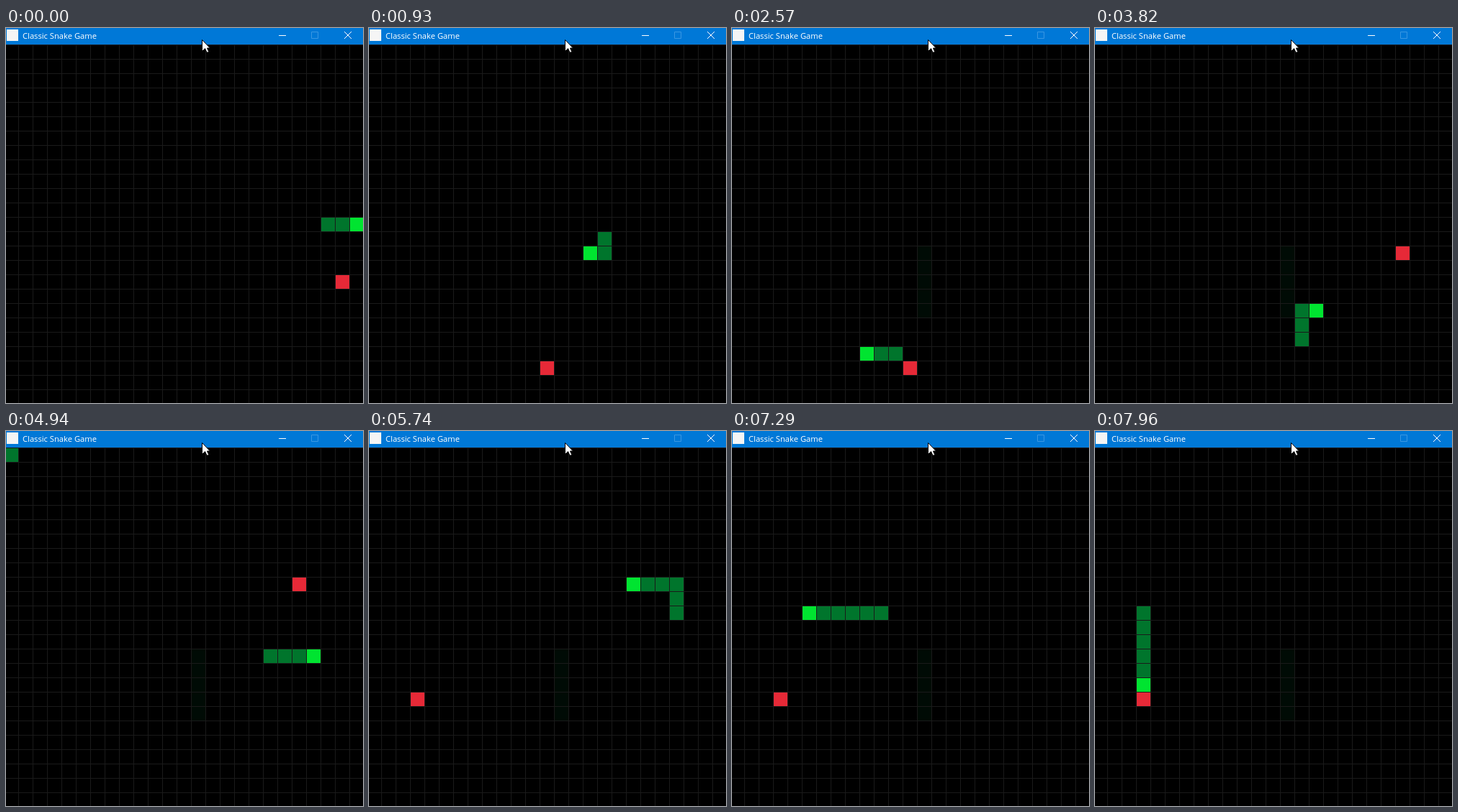
Write an HTML page with a canvas that moves like this. It is 496 px wide and 522 px high and loops after 8000 ms.

```html
<!DOCTYPE html>
<html lang="en">
<head>
<meta charset="utf-8">
<title>Classic Snake Game</title>
<style>
  html, body { margin: 0; width: 100%; height: 100%; overflow: hidden; background: #000; }
  canvas, svg { position: absolute; left: 0; top: 0; display: block; }
  text { font: 500 11.2px "Open Sans", "Noto Sans", sans-serif; fill: #fff; }
</style>
</head>
<body>
<canvas id="board" width="496" height="522"></canvas>
<svg width="496" height="522" viewBox="0 0 496 522">
  <rect width="496" height="23" fill="#0078d7"/>
  <rect x="1" y="2" width="16" height="16" fill="#f5f5f5"/>
  <text x="23" y="15">Classic Snake Game</text>
  <g fill="none" stroke="#fff">
    <path d="M379 10.5h10"/>
    <path d="M424.5 5.5h9v9h-9z" stroke="#3a97e2"/>
    <path d="M470 5l10 10M480 5l-10 10"/>
  </g>
  <path d="M272.5 16.5v16l4-4 2.5 5.5h2l.5-1.5-2-4.5h4z" fill="#fff" stroke="#000"/>
</svg>
<script>
const LOOP = 8000, CELL = 20, LEFT = -2, TOP = 24;
const HEAD = '#00e430', BODY = '#00752c', FOOD = '#e62937';
const LINE = '#1a1a1a', TRAIL = '#000b05';

const TICK = 66, LAG = 12; // the screen refreshes in ticks, in ms
const paces = [1.875, 1.675, 1.56, 1.5]; // ticks per move, faster after each meal
const foods = [[12, 22], [21, 14], [20, 9], [3, 17]];
const route = 'R4 D2 L3 D7 L4 D1 R5 U4 R3 U4 R4 U5 L10 D2 L8 D5';
const dirs = { R: [1, 0], L: [-1, 0], U: [0, -1], D: [0, 1] };

function play() {
  const states = [
    { at: 0, snake: [[24, 12], [23, 12], [22, 12]], food: [23, 16] }
  ];
  let snake = [[12, 12], [11, 12], [10, 12]], meal = 0, clock = 1.75;
  const save = () => states.push({
    at: Math.floor(clock) * TICK - LAG, snake, food: foods[meal]
  });
  save(); // restart after hitting the wall
  for (const leg of route.split(' ')) {
    const [dx, dy] = dirs[leg[0]];
    for (let n = +leg.slice(1); n > 0; n--) {
      const head = [snake[0][0] + dx, snake[0][1] + dy];
      snake = [head, ...snake.slice(0, -1)];
      clock += paces[meal];
      if (String(head) === String(foods[meal])) {
        meal++;
        snake.push([0, 0]); // a new segment waits in the corner for one move
      }
      save();
    }
  }
  return states;
}

const states = play();
const ctx = document.getElementById('board').getContext('2d');

function cell([col, row], color) {
  ctx.fillStyle = color;
  ctx.fillRect(LEFT + col * CELL, TOP + row * CELL, CELL - 1, CELL - 1);
}

function draw(step) {
  const { snake, food } = states[step];
  ctx.fillStyle = '#000';
  ctx.fillRect(0, 0, 496, 522);
  ctx.fillStyle = LINE;
  for (let i = 0; i < 25; i++) {
    ctx.fillRect(LEFT - 1 + i * CELL, TOP - 1, 1, 500);
    ctx.fillRect(0, TOP - 1 + i * CELL, 496, 1);
  }
  // faint trail left by the first long run down
  for (let row = 14; row < 19; row++) {
    if (step >= row - 4) cell([13, row], TRAIL);
  }
  cell(food, FOOD);
  snake.forEach((part, i) => cell(part, i ? BODY : HEAD));
}

const start = performance.now();
function tick() {
  const t = (performance.now() - start) % LOOP;
  draw(states.filter(s => s.at <= t).length - 1);
  requestAnimationFrame(tick);
}
tick();
</script>
</body>
</html>
```
